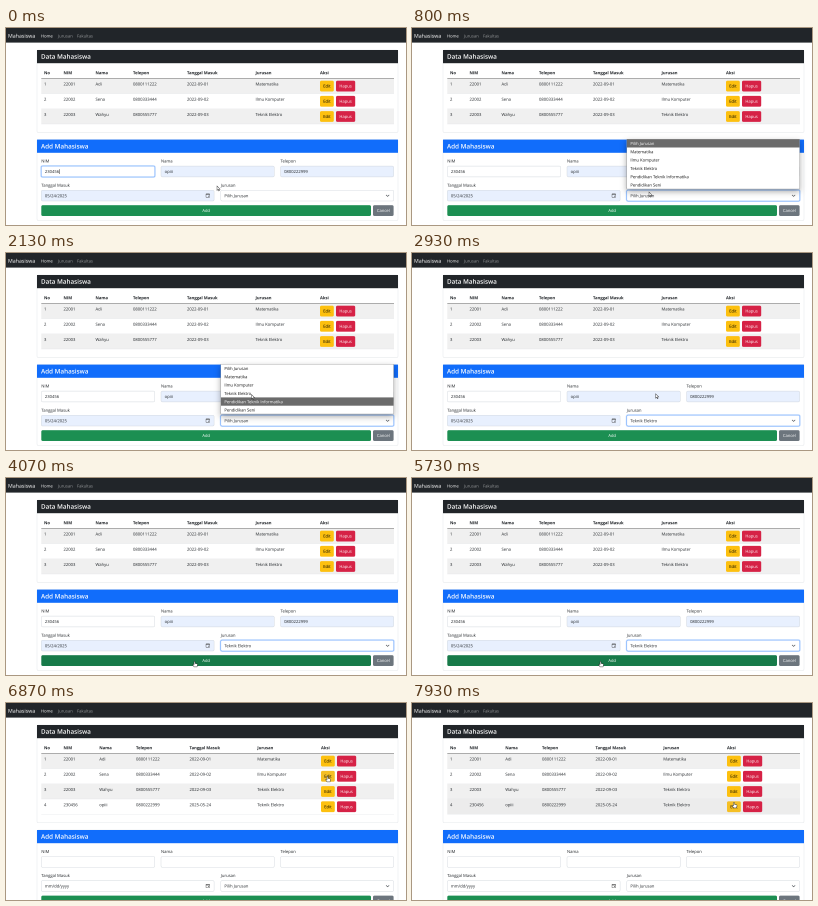
These frames come from a looping animation (400 by 197 pixels, 8000 ms). An HTML page with a canvas:

```html
<!DOCTYPE html>
<html lang="id">
<head>
<meta charset="utf-8">
<title>Data Mahasiswa</title>
<style>
html, body { margin: 0; width: 100%; height: 100%; overflow: hidden; background: #fff; }
canvas { display: block; width: 400px; height: 197px; }
</style>
</head>
<body>
<canvas id="stage" width="400" height="197"></canvas>
<script>
const W = 400, H = 197;
function layer(scale) {
  const c = document.createElement('canvas');
  c.width = W * scale;
  c.height = H * scale;
  return c.getContext('2d');
}
// Drawn at 4x and halved twice, so that the tiny text stays smooth.
const ctx = layer(4), half = layer(2);
const screen2d = document.getElementById('stage').getContext('2d');

const LOOP = 8000, OPEN = 600, PICK = 2800, PRESS = 6150, ADDED = 6270, ROW_HOVER = 6950;
const INK = '#212529', LINE = '#dee2e6', FILLED = '#e8f0fe', BLUE = '#116dfb';
const ROW_TOP = 50.4, ROW_H = 15.2, LIST_TOP = 111.2, OPTION_H = 8.3;

const students = [
  ['1', '22001', 'Adi', '0800111222', '2022-09-01', 'Matematika'],
  ['2', '22002', 'Sena', '0800333444', '2022-09-02', 'Ilmu Komputer'],
  ['3', '22003', 'Wahyu', '0800555777', '2022-09-03', 'Teknik Elektro'],
  ['4', '230456', 'opiii', '0800222999', '2025-05-24', 'Teknik Elektro']
];
const heads = ['No', 'NIM', 'Nama', 'Telepon', 'Tanggal Masuk', 'Jurusan', 'Aksi'];
const colsBefore = [38, 57.5, 89.5, 127, 181, 249.5, 314];
const colsAfter = [38, 57.5, 93.3, 130, 183.5, 251.3, 315];
const options = ['Pilih Jurusan', 'Matematika', 'Ilmu Komputer', 'Teknik Elektro',
  'Pendidikan Teknik Informatika', 'Pendidikan Seni'];

// time, x, y of the pointer tip
const path = [
  [0, 211, 158], [150, 211, 158], [500, 237, 164], [950, 237, 164], [1250, 239, 155],
  [1550, 244, 149], [2000, 246, 149], [2040, 246, 147], [2120, 245.5, 141.5],
  [2900, 244, 140.5], [3550, 188.5, 183.3], [6200, 188.5, 183.3],
  [6760, 321.5, 73.3], [7150, 321.5, 73.3], [7650, 322, 99.3], [8000, 322, 99.3]
];

function pointer(t) {
  t = Math.max(0, t);
  const i = Math.max(1, path.findIndex(p => p[0] >= t));
  const [t0, x0, y0] = path[i - 1], [t1, x1, y1] = path[i];
  const k = (t - t0) / (t1 - t0), e = k * k * (3 - 2 * k);
  return { x: x0 + (x1 - x0) * e, y: y0 + (y1 - y0) * e };
}

const within = (p, x, y, w, h) => p.x >= x && p.x <= x + w && p.y >= y && p.y <= y + h;

function rect(x, y, w, h, color) {
  ctx.fillStyle = color;
  ctx.fillRect(x, y, w, h);
}

function box(x, y, w, h, fill, stroke, r = 1.4, width = 0.4) {
  ctx.beginPath();
  ctx.roundRect(x, y, w, h, r);
  if (fill) { ctx.fillStyle = fill; ctx.fill(); }
  if (stroke) { ctx.strokeStyle = stroke; ctx.lineWidth = width; ctx.stroke(); }
}

function text(s, x, y, color = INK, size = 4.15, weight = 400, align = 'left') {
  ctx.font = `${weight} ${size}px "Open Sans", "Noto Sans", sans-serif`;
  ctx.textAlign = align;
  ctx.fillStyle = color;
  ctx.fillText(s, x, y);
}

function stroke(points, color, width) {
  ctx.beginPath();
  points.forEach(p => ctx.lineTo(...p));
  ctx.strokeStyle = color;
  ctx.lineWidth = width;
  ctx.stroke();
}

function button(label, x, y, w, fill, color = '#fff') {
  box(x, y, w, 10.8, fill);
  text(label, x + w / 2, y + 6.9, color, 4.15, 400, 'center');
}

function field(x, y, w, value, { fill = '#fff', focus = false, color = INK } = {}) {
  if (focus) box(x - 0.5, y - 0.5, w + 1, 11.8, null, '#c2dbfe', 1.9, 1);
  box(x, y, w, 10.8, fill, focus ? '#6ea8fe' : '#ced4da', 1.4, focus ? 0.5 : 0.4);
  text(value, x + 3.6, y + 7, color);
}

function cardHead(y, title, color) {
  rect(31, y, 361, 13.2, color);
  text(title, 35, y + 8.8, '#fff', 6.3, 600);
}

function navbar() {
  rect(0, 0, W, 14.6, INK);
  text('Mahasiswa', 2, 9.7, '#fff', 5.28);
  text('Home', 35, 9.4, '#fff');
  text('Jurusan', 52, 9.4, '#9b9d9f');
  text('Fakultas', 71, 9.4, '#9b9d9f');
}

function table(t, added) {
  const cols = added ? colsAfter : colsBefore;
  const count = added ? 4 : 3;
  const p = pointer(t), late = pointer(t - 120);
  const bottom = ROW_TOP + count * ROW_H;
  box(31, 22, 361, bottom + 8.6 - 22, '#fff', LINE);
  cardHead(22, 'Data Mahasiswa', INK);
  heads.forEach((h, i) => text(h, cols[i], 46.3, INK, 4.15, 700));
  for (let r = 0; r < count; r++) {
    const y = ROW_TOP + r * ROW_H;
    const hover = t > ROW_HOVER && within(late, 35, y, 353, ROW_H);
    if (hover || r % 2 === 0) rect(35.3, y, 352.7, ROW_H, hover ? '#ececec' : '#f0f0f0');
    rect(35.3, y + ROW_H - 0.15, 352.7, 0.3, LINE);
    students[r].forEach((s, i) => text(s, cols[i], y + 7.2));
    const x = cols[6];
    const lit = within(p, x, y + 2.3, 14, 10.8);
    button('Edit', x, y + 2.3, 13.8, lit ? '#f5bf24' : '#fdc00f', '#000');
    button('Hapus', x + 16, y + 2.3, 19.2, '#d62246');
  }
  rect(35.3, ROW_TOP - 0.3, 352.7, 0.5, '#666');
}

function calendar(x, y) {
  box(x, y, 3.6, 3.6, null, '#444', 0.4, 0.4);
  rect(x, y + 0.5, 3.6, 0.6, '#444');
  rect(x + 2, y + 2, 0.8, 0.8, '#444');
}

function form(t, added) {
  const fill = added ? '#fff' : FILLED;
  const student = students[3];
  const typing = !added && t < 420;
  const value = i => added ? '' : student[i];
  ctx.save();
  ctx.translate(0, added ? 15.4 : 0);
  box(31, 111.6, 361, 80.9, '#fff', LINE);
  cardHead(111.6, 'Add Mahasiswa', BLUE);

  text('NIM', 35.3, 134.5);
  text('Nama', 155, 134.5);
  text('Telepon', 274.5, 134.5);
  field(35.3, 138.1, 113.5, value(1), { focus: typing });
  field(155, 138.1, 113.3, value(2), { fill });
  field(274.5, 138.1, 113.2, value(3), { fill });
  if (typing) rect(53.6, 141.2, 0.4, 4.8, '#000');

  text('Tanggal Masuk', 35.3, 158.7);
  text('Jurusan', 214.8, 158.7);
  field(35.3, 162.2, 172.8, added ? 'mm/dd/yyyy' : '05/24/2025', { fill });
  calendar(200, 165.8);
  const picked = t >= PICK && !added;
  field(214.8, 162.2, 172.9, picked ? 'Teknik Elektro' : options[0],
    { focus: t >= OPEN && !added });
  stroke([[380, 166.9], [381.6, 168.4], [383.2, 166.9]], '#343a40', 0.55);

  const over = !added && within(pointer(t), 35, 177, 330, 11);
  const green = !over ? '#1c8f52' : t >= PRESS ? '#146c43' : '#177a49';
  button('Add', 35.3, 177.2, 329.7, green);
  button('Cancel', 367, 177.2, 20.6, '#6c757d');
  ctx.restore();
}

function dropdown(t) {
  if (t < OPEN || t >= PICK) return;
  const x = 214.8, w = 172.8, h = OPTION_H * options.length;
  const late = pointer(t - 100);
  const active = within(late, x, LIST_TOP, w, h - 0.1)
    ? Math.floor((late.y - LIST_TOP) / OPTION_H) : 0;
  ctx.save();
  ctx.shadowColor = 'rgba(0, 0, 0, 0.35)';
  ctx.shadowBlur = 24;
  ctx.shadowOffsetY = 10;
  rect(x, LIST_TOP, w, h, '#fff');
  ctx.restore();
  options.forEach((o, i) => {
    const y = LIST_TOP + i * OPTION_H;
    if (i === active) rect(x, y, w, OPTION_H, '#6b6b6b');
    text(o, x + 3.6, y + 5.8, i === active ? '#fff' : '#111');
  });
  ctx.strokeStyle = '#999';
  ctx.lineWidth = 0.4;
  ctx.strokeRect(x, LIST_TOP, w, h);
}

const arrow = new Path2D('M0 0V4.4L1 3.5L1.7 5L2.4 4.7L1.7 3.2H3.1Z');
const hand = new Path2D('M-.5 .4Q0 -.3 .5 .4V2.1L2.7 2.6Q3.1 2.8 3 3.4L2.5 5.6H-.4L-1.8 3.5Q-1.7 2.8 -1 3.1L-.5 3.5Z');

function cursor(t, added) {
  const p = pointer(t);
  const onAdd = !added && within(p, 35, 177, 330, 11);
  const onEdit = added && within(p, 315, 52, 35, 58);
  const shape = onAdd || onEdit ? hand : arrow;
  ctx.save();
  ctx.translate(p.x, p.y);
  ctx.fillStyle = '#fff';
  ctx.strokeStyle = '#222';
  ctx.lineWidth = 0.4;
  ctx.fill(shape);
  ctx.stroke(shape);
  ctx.restore();
}

function shrink(from, to) {
  const { width, height } = to.canvas;
  to.imageSmoothingEnabled = true;
  to.drawImage(from.canvas, 0, 0, width, height);
}

function draw(t) {
  const added = t >= ADDED;
  ctx.setTransform(4, 0, 0, 4, 0, 0);
  ctx.textRendering = 'geometricPrecision';
  rect(0, 0, W, H, '#fff');
  navbar();
  table(t, added);
  form(t, added);
  dropdown(t);
  cursor(t, added);
  shrink(ctx, half);
  shrink(half, screen2d);
}

const start = performance.now();
function tick() {
  draw((performance.now() - start) % LOOP);
  requestAnimationFrame(tick);
}
tick();
</script>
</body>
</html>
```
